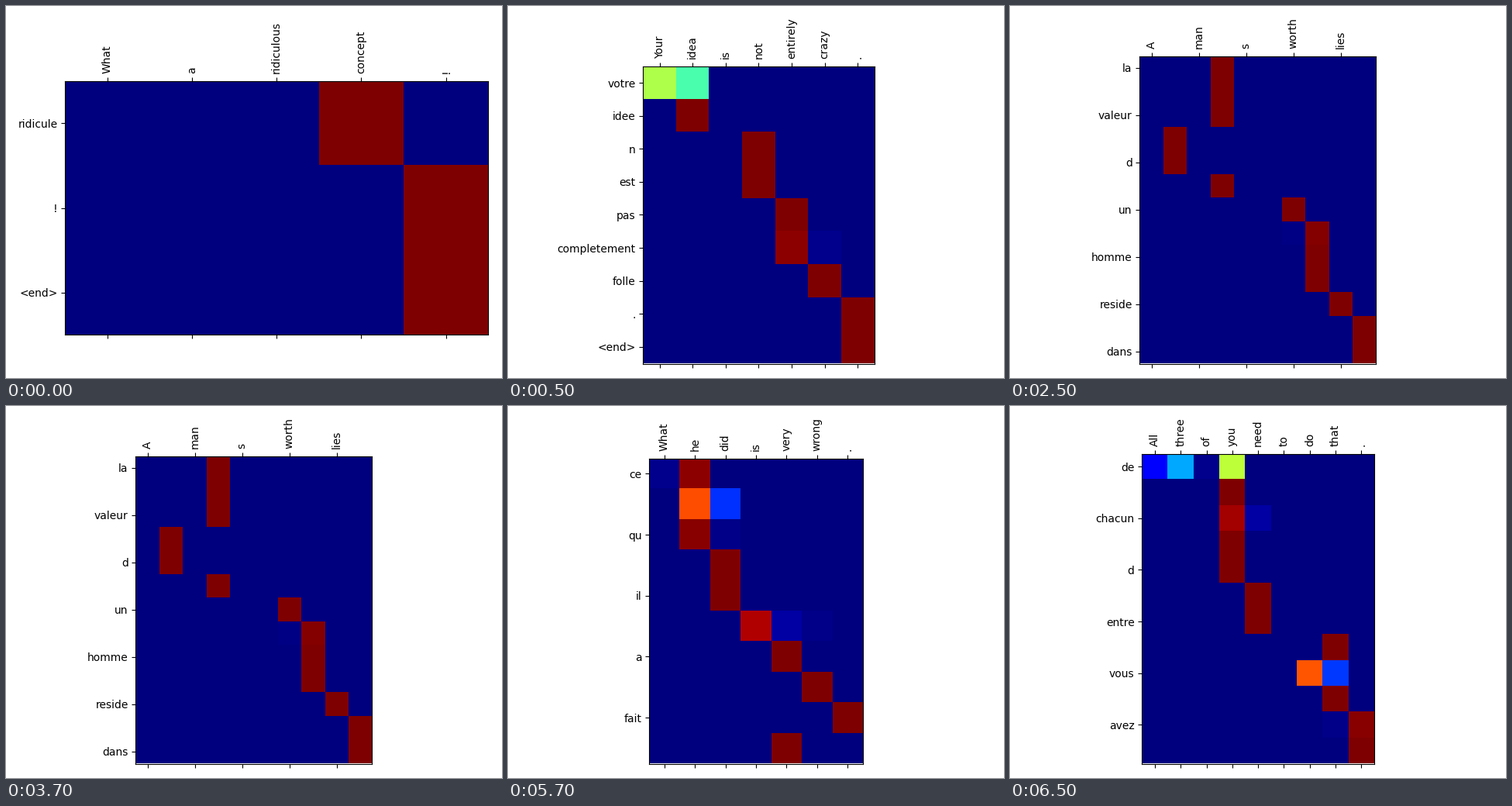
A matplotlib script that plays this animation: 640 by 480 pixels, repeating every 8000 ms.

```python
import numpy as np
import matplotlib.pyplot as plt
from matplotlib.animation import FuncAnimation

WIDTH, HEIGHT = 640, 480
STEP_MS, STEPS = 500, 16

plt.rcParams["font.family"] = "DejaVu Sans"
fig = plt.figure(figsize=(WIDTH / 100, HEIGHT / 100), dpi=100)

# Each attention row is the attended column, or {column: weight} when shared.
# "box" is the left, top and bottom of the cells in pixels.
SCENES = [
    dict(start=0, box=(76.2, 96.7, 424.3), gap=0, cols=5, x_step=1, y_step=1,
         source="What a ridiculous concept !", output="ridicule ! <end>",
         rows=[3, 4, 4]),
    dict(start=1, box=(174.3, 77.7, 461.2), gap=0.7, cols=7, x_step=1, y_step=1,
         source="Your idea is not entirely crazy .",
         output="votre idee n est pas completement folle . <end>",
         rows=[{0: .56, 1: .44}, 1, 3, 3, 4, {4: .985, 5: .015}, 5, 6, 6]),
    dict(start=5, box=(167.4, 64.6, 461.2), gap=0.7, cols=10, x_step=2, y_step=2,
         source="A man s worth lies",
         output="la valeur d un homme reside dans",
         rows=[3, 3, 3, 1, 1, 3, 6, {6: .005, 7: .995}, 7, 7, 8, 9, 9]),
    dict(start=9, box=(182.3, 67.7, 461.2), gap=0.7, cols=7, x_step=1, y_step=2,
         source="What he did is very wrong .",
         output="ce qu il a fait",
         rows=[{0: .015, 1: .985}, {1: .825, 2: .175}, {1: .992, 2: .008},
               2, 2, {3: .955, 4: .035, 5: .01}, 4, 5, 6, 4]),
    dict(start=13, box=(170.3, 61.6, 461.2), gap=0.7, cols=9, x_step=1, y_step=2,
         source="All three of you need to do that .",
         output="de chacun d entre vous avez",
         rows=[{0: .115, 1: .29, 2: .015, 3: .58}, 3, {3: .965, 4: .035},
               3, 3, 4, 4, 7, {6: .82, 7: .18}, 7, {7: .008, 8: .992}, 8]),
]


def attention_matrix(rows, cols):
    matrix = np.zeros((len(rows), cols))
    for i, row in enumerate(rows):
        weights = row if isinstance(row, dict) else {row: 1}
        for col, weight in weights.items():
            matrix[i, col] = weight
    return matrix


def draw_scene(scene):
    left, top, bottom = scene["box"]
    rows, cols, gap = scene["rows"], scene["cols"], scene["gap"]
    cell = (bottom - top) / len(rows)
    height = bottom + gap - top

    fig.clear()
    ax = fig.add_axes([left / WIDTH, 1 - (bottom + gap) / HEIGHT,
                       cols * cell / WIDTH, height / HEIGHT])
    ax.imshow(attention_matrix(rows, cols), cmap="jet", vmin=0, vmax=1,
              aspect="auto", interpolation="nearest")
    ax.set_ylim(height / cell - 0.5, -0.5)

    source, output = scene["source"].split(), scene["output"].split()
    ax.set_xticks(np.arange(len(source)) * scene["x_step"], source, rotation=90)
    ax.set_yticks(np.arange(len(output)) * scene["y_step"], output)
    ax.tick_params(axis="x", top=True, bottom=True,
                   labeltop=True, labelbottom=False)


def update(step):
    draw_scene([s for s in SCENES if s["start"] <= step][-1])
    return []


anim = FuncAnimation(fig, update, frames=STEPS, interval=STEP_MS,
                     init_func=lambda: update(0), repeat=True)
plt.show()
```
